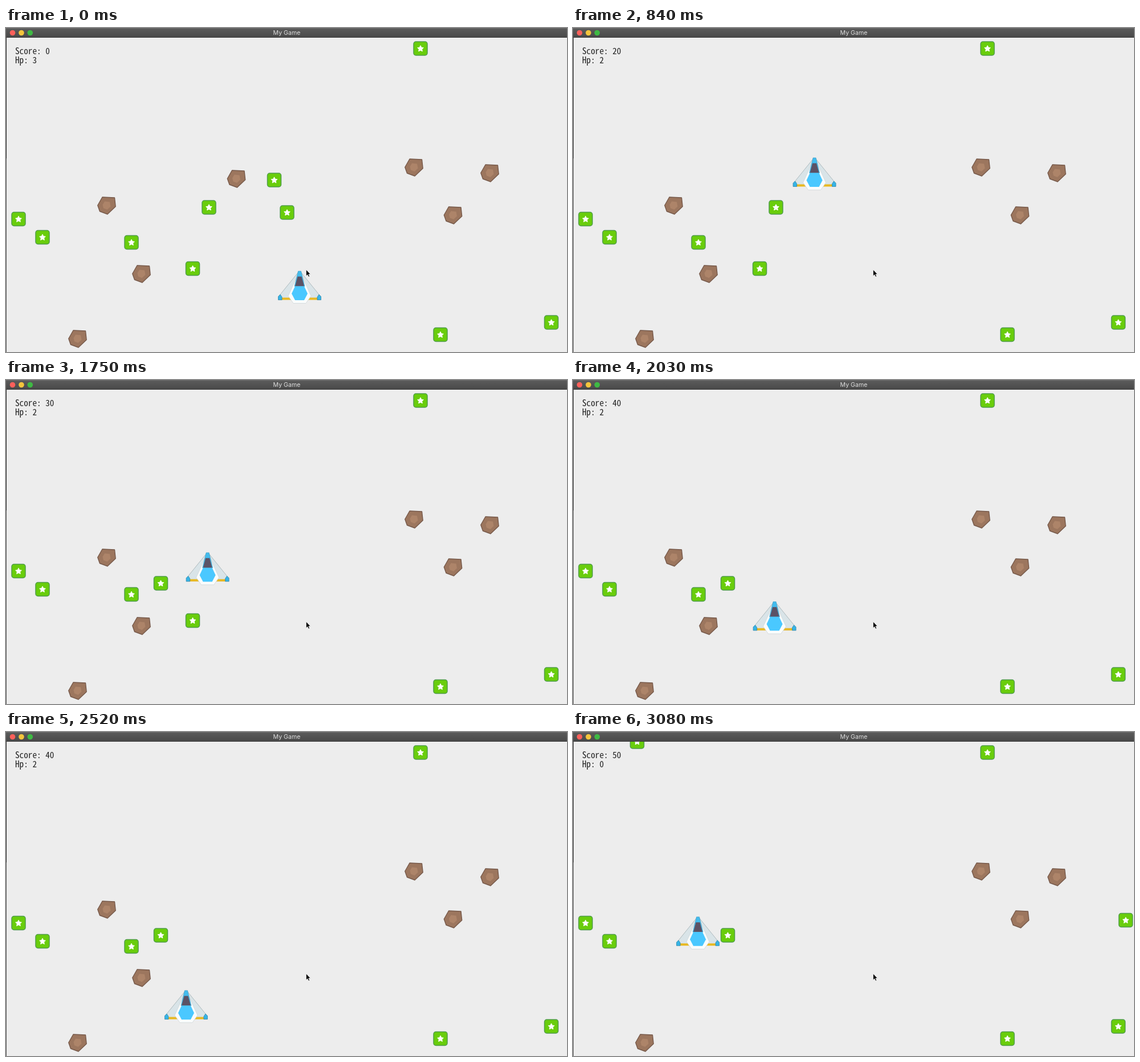
Recreate the animation shown at these times as an HTML page. Size 984 by 569 pixels, loop 3150 ms.

```html
<!DOCTYPE html>
<html lang="en">
<head>
<meta charset="utf-8">
<title>My Game</title>
<style>
  html, body { margin: 0; width: 100%; height: 100%; overflow: hidden; background: #ededed; }
  svg { display: block; }
  .hud { font: 15.2px "Noto Sans Mono CJK JP", "Noto Sans CJK JP", monospace; font-feature-settings: "hwid"; fill: #222; white-space: pre; }
  .title { font: 10.6px Inter, sans-serif; fill: #dedede; text-anchor: middle; }
</style>
</head>
<body>
<svg width="984" height="569" viewBox="0 0 984 569">
  <defs>
    <linearGradient id="bar" x2="0" y2="1">
      <stop stop-color="#5c5c5c"/><stop offset="1" stop-color="#484848"/>
    </linearGradient>
    <g id="coin">
      <rect x="-12" y="-12" width="24" height="24" rx="4" fill="#69cd0c" stroke="#4f9d4a" stroke-width="1.5"/>
      <path d="M0-5.2 1.7-1.8 5.3-1.3 2.7 1.3 3.3 5 0 3.2-3.3 5-2.7 1.3-5.3-1.3-1.7-1.8Z" fill="#fff" stroke="#fff" stroke-linejoin="round"/>
    </g>
    <g id="rock">
      <path d="M-7.5-14.5 14-13.5 15.7 2 1.5 15.5-12 10.5-15.7 0Z" fill="#9c765e" stroke="#76594a" stroke-width="1.4" stroke-linejoin="round"/>
      <path d="M-3.5-7 5.5-6 7 2 1 7.5-5.5 5-7-1Z" fill="#ad8469"/>
    </g>
  </defs>
  <rect width="984" height="569" fill="#ededed"/>
  <g id="items"></g>
  <g id="ship">
    <path d="M-2-27-36 15V21H36V15L2-27Z" fill="#d9e4e8" stroke="#aebabd"/>
    <path d="M-32 18H32V22H-32Z" fill="#e8b923"/>
    <path d="M-37.5 22V16L-34 12.5-31 17V22ZM37.5 22V16L34 12.5 31 17V22Z" fill="#36b4e6" stroke="#3487a8" stroke-width=".8"/>
    <path d="M-4-20-20 15-11 28H11L20 15 4-20Z" fill="#fafcfc" stroke="#d0d6d8" stroke-width=".8"/>
    <path d="M-2.5-28.5H2.5L9-2H-9Z" fill="#43bcee" stroke="#3595bd" stroke-width=".6"/>
    <path d="M-3.5-19H3.5L8-2H-8Z" fill="#5b5265"/>
    <path d="M-8-2H8L14 11 8 22.5H-8L-14 11Z" fill="#4ac8ff"/>
  </g>
  <text class="hud" x="16" y="46" id="score"></text>
  <text class="hud" x="16" y="61.5" id="hp"></text>
  <path d="M526.5 424.5V435.5L529 433.2 530.7 437 532.5 436.2 530.8 432.5H534Z" stroke="#fff" stroke-width=".6"/>
  <path d="M.5 16V569" stroke="#555"/>
  <path d="M.5 16V229" stroke="#222"/>
  <rect width="984" height="17" fill="url(#bar)"/>
  <path d="M0 .5H984" stroke="#6c6c6c"/>
  <path d="M0 16.5H984" stroke="#3a3a3a"/>
  <circle cx="11.5" cy="8.5" r="4.8" fill="#fc605b"/>
  <circle cx="27" cy="8.5" r="4.8" fill="#f5c53c"/>
  <circle cx="42.3" cy="8.5" r="4.8" fill="#3fb944"/>
  <text class="title" x="492.5" y="12.4">My Game</text>
</svg>
<script>
const STEP = 70, LOOP = 3150, SPEED = 5.38, NEVER = 99;
const $ = id => document.getElementById(id);

// x, y, step taken, step spawned
const coins = [
  [22, 335.5], [64, 367.5], [727, 36], [762, 538.5], [956.5, 517],
  [493, 324, 5], [470.5, 267, 8], [356, 315, 23], [327.5, 422.5, 28], [220, 376.5, 41],
  [271.5, 357, NEVER, 23], [112.5, 17, NEVER, 39], [969.5, 330.5, NEVER, 41]
];
const rocks = [
  [715.5, 244.5], [848.5, 254.5], [784, 328.5], [125.5, 545.5],
  [404, 264.5, 11], [237.5, 431.5, 39], [176.5, 311.5, 44]
];

function place(kind, [x, y, gone = NEVER, born = 0]) {
  const node = document.createElementNS("http://www.w3.org/2000/svg", "use");
  node.setAttribute("href", "#" + kind);
  node.setAttribute("transform", `translate(${x} ${y})`);
  $("items").append(node);
  return { node, gone, born };
}
const coinItems = coins.map(c => place("coin", c));
const rockItems = rocks.map(r => place("rock", r));
const items = [...coinItems, ...rockItems];

// Key held from a step on: four moves per step, up to a count
const held = (k, start, count) => Math.min(count, Math.max(0, 4 * (k - start)));
const taken = (list, k) => list.filter(i => i.gone <= k).length;

function draw(now) {
  const k = Math.floor(now % LOOP / STEP);
  const left = held(k, 7.75, 30) + held(k, 34.25, 25);
  const up = held(k, .75, 37) + held(k, 38, 24);
  const down = held(k, 21.5, 41) + held(k, 32, 1);
  $("ship").setAttribute("transform",
    `translate(${515 - SPEED * left} ${455.5 + SPEED * (down - up)})`);
  for (const { node, gone, born } of items)
    node.style.display = k >= born && k < gone ? "" : "none";
  $("score").textContent = "Score: " + 10 * taken(coinItems, k);
  $("hp").textContent = "Hp: " + (3 - taken(rockItems, k));
}

const start = performance.now();
function tick() {
  draw(performance.now() - start);
  requestAnimationFrame(tick);
}
tick();
</script>
</body>
</html>
```
